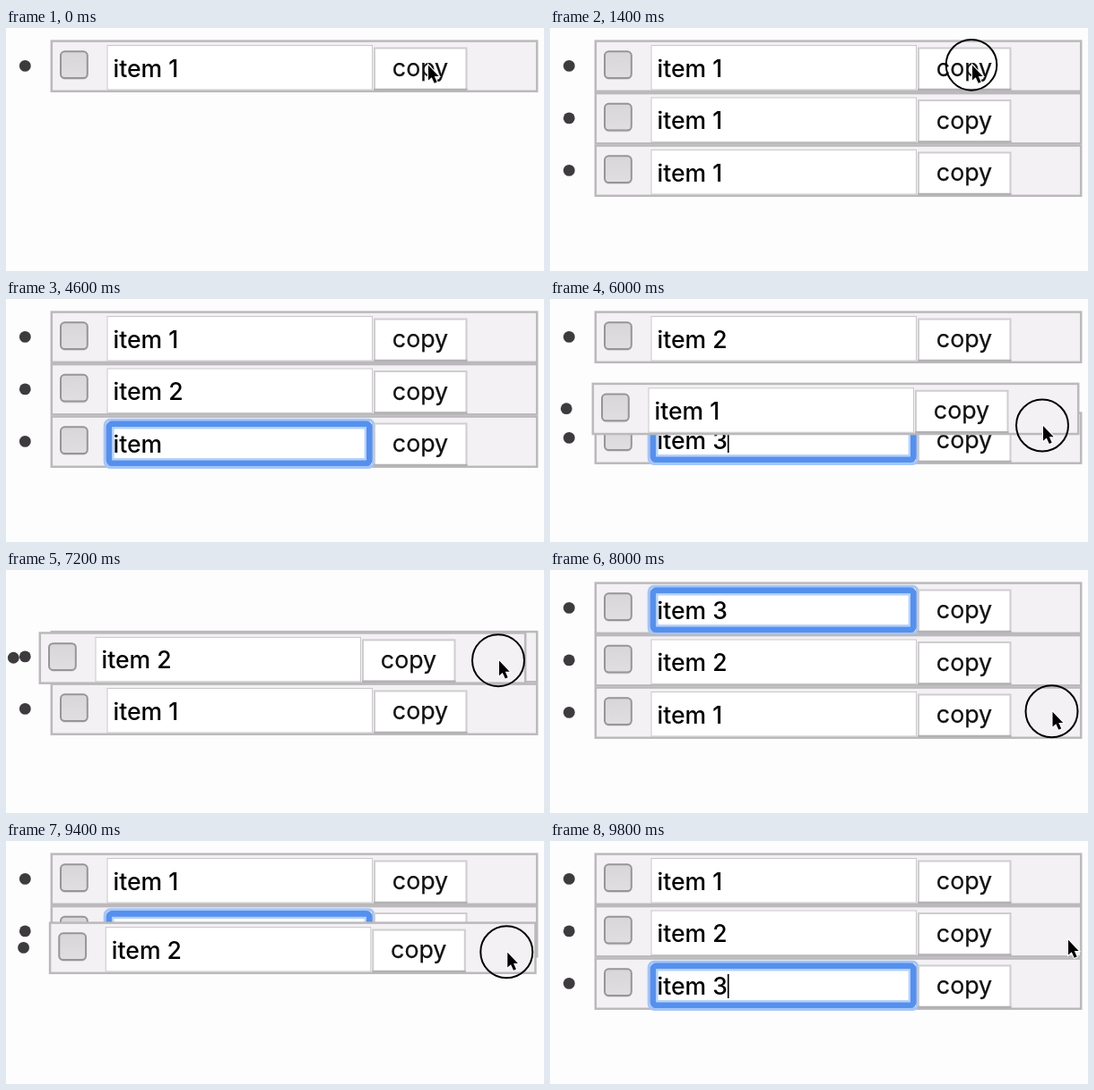
Recreate the animation shown at these times as an HTML page. Size 600 px wide and 272 px high, loop 10000 ms.

```html
<!DOCTYPE html>
<html lang="en">
<head>
<meta charset="utf-8">
<title>Sortable list</title>
<style>
  html, body { margin: 0; width: 100%; height: 100%; overflow: hidden; background: #fefdfe; }
  svg { display: block; width: 600px; height: 272px; }
  text { font: 26.8px Inter, "Open Sans", sans-serif; fill: #111; stroke: #111; stroke-width: .25; white-space: pre; }
  .label { font-size: 26.6px; font-weight: 500; fill: #000; stroke: none; }
</style>
</head>
<body>
<svg viewBox="0 0 600 272">
  <defs>
    <linearGradient id="box" x2="0" y2="1">
      <stop stop-color="#d8d6d8"/><stop offset="1" stop-color="#e0dee0"/>
    </linearGradient>
  </defs>
  <g id="list"></g>
  <g id="pointer">
    <circle cy=".3" fill="none" stroke="#000" stroke-width="2"/>
    <path id="arrow" transform="translate(1 1.5) scale(.82)" d="M0 -1V19.5L4.6 15.4L8.2 23.4L11.8 21.8L8.3 14H14.2Z" fill="#000" stroke="#fff" stroke-width="2.6" paint-order="stroke"/>
    <path id="beam" d="M-5 -10Q0 -10 0 -7Q0 -10 5 -10M0 -7V7M-5 10Q0 10 0 7Q0 10 5 10M-3 3H3" fill="none" stroke="#222" stroke-width="1.8"/>
  </g>
</svg>
<script>
const LOOP = 10000, STEP = 200, PITCH = 58.5, GAP_LOSS = 4;
const TRAVEL = 600, COPY_DELAY = 400, KEY_DELAY = 400, TYPING = 600, BLINK = 600;

// Everything the user does; the list state follows from these actions.
const actions = [
  { kind: "copy", at: 200, hold: 600, x: 470, y: 41 },
  { kind: "copy", at: 1000, hold: 600, x: 470, y: 41 },
  { kind: "edit", id: "2", at: 2200, hold: 200, x: 223, y: 97, wait: 600 },
  { kind: "edit", id: "3", at: 3600, hold: 400, x: 384, y: 162, wait: 800 },
  { kind: "drag", id: "1", at: 5600, hold: 800, x: 552, y: 61, reach: 113.5, sway: 3 },
  { kind: "drag", id: "2", at: 6800, hold: 800, x: 562, y: 45, reach: 79, sway: 13 },
  { kind: "drag", id: "1", at: 8000, hold: 800, x: 559.5, y: 158, reach: -138, sway: 8 },
  { kind: "drag", id: "2", at: 9200, hold: 600, x: 560, y: 164, reach: -80, sway: 2 },
  { kind: "rest", at: 9800, hold: 0, x: 577, y: 110 }
];
const ofKind = kind => actions.filter(a => a.kind === kind);
const [copies, edits, drags] = ["copy", "edit", "drag"].map(ofKind);

const $ = selector => document.querySelector(selector);
const show = (el, on) => el.setAttribute("display", on ? "inline" : "none");
const move = (el, x, y) => el.setAttribute("transform", `translate(${x} ${y})`);
const progress = (a, t) => a.hold ? Math.min(1, (t - a.at) / a.hold) : 1;

function dragOffset({ reach = 0, sway = 0, ...action }, t) {
  const k = progress(action, t);
  return [-sway * Math.sin(Math.PI * k), reach * Math.sin(Math.PI * k / 2)];
}

function pointerAt(t) {
  const next = actions.find(a => a.at > t);
  const last = actions.findLast(a => a.at <= t);
  if (!last) return [next.x, next.y];
  const [dx, dy] = dragOffset(last, t);
  const x = last.x + dx, y = last.y + dy;
  if (!next) return [x, y];
  const leave = Math.max(last.at + last.hold, next.at - TRAVEL);
  const k = Math.max(0, (t - leave) / (next.at - leave));
  return [x + (next.x - x) * k, y + (next.y - y) * k];
}

// Slot order; a held row passes a neighbour only after a full row of travel.
function arrange(t) {
  const added = copies.filter(a => t >= a.at + COPY_DELAY).length;
  const ids = ["1", "2", "3"].slice(0, 1 + added);
  let held = null;
  for (const drag of drags.filter(a => t > a.at)) {
    const dropped = t >= drag.at + drag.hold;
    const rows = dragOffset(drag, t)[1] / PITCH;
    const home = ids.indexOf(drag.id);
    ids.splice(home, 1);
    ids.splice(home + (dropped ? Math.round(rows) : Math.trunc(rows)), 0, drag.id);
    if (!dropped) held = { drag, home };
  }
  return { ids, held };
}

function labelAt(id, t) {
  const edit = edits.find(a => a.id === id);
  const typed = edit ? t - edit.at - edit.wait : -1;
  if (typed < 0) return "item 1";
  return typed < KEY_DELAY ? "item " : "item " + id;
}

function makeRow() {
  const row = document.createElementNS("http://www.w3.org/2000/svg", "g");
  row.innerHTML = `
    <circle cx="21.3" cy="42.4" r="6.4" fill="#3d3b3e"/>
    <rect x="50.8" y="14.6" width="541.4" height="56.2" fill="#f3f1f3" stroke="#bbb9bb" stroke-width="2.5"/>
    <rect x="61" y="27.5" width="30" height="30.5" rx="5" fill="#d9d7d9"/>
    <rect x="61" y="26.3" width="29.8" height="29.8" rx="4.5" fill="url(#box)" stroke="#979597" stroke-width="2"/>
    <rect x="113" y="19.5" width="295.5" height="49.5" fill="#fff" stroke="#c9c7c9"/>
    <g class="ring" fill="none">
      <rect x="110.2" y="18.2" width="300" height="53.2" rx="6" stroke="#a4c5f8" stroke-width="3"/>
      <rect x="115" y="23" width="290.2" height="43.6" rx="3" stroke="#5590ee" stroke-width="6.8"/>
      <rect x="119.4" y="27.4" width="281.4" height="34.8" stroke="#b4d0fa" stroke-width="2.2"/>
    </g>
    <rect x="411" y="22.5" width="102.5" height="46.5" fill="#fff" stroke="#cfcdcf" stroke-width="2"/>
    <path d="M410 69H514.5" stroke="#b3b1b3" stroke-width="2.5"/>
    <text class="label" x="119.5" y="54.5"></text>
    <rect class="caret" y="32" width="1.6" height="27" fill="#000"/>
    <text x="462" y="54" text-anchor="middle">copy</text>`;
  const part = name => row.querySelector("." + name);
  return { row, label: part("label"), ring: part("ring"), caret: part("caret") };
}

const rows = { 1: makeRow(), 2: makeRow(), 3: makeRow() };
Object.values(rows).forEach(({ row }) => $("#list").append(row));

function drawRows(t) {
  const { ids, held } = arrange(t);
  const gap = held ? ids.indexOf(held.drag.id) : Infinity;
  const focus = edits.findLast(a => a.at <= t);

  for (const id in rows) {
    const { row, label, ring, caret } = rows[id];
    const slot = ids.indexOf(id), focused = focus?.id === id;
    show(row, slot >= 0);
    label.textContent = labelAt(id, t);
    show(ring, focused);
    show(caret, focused && (t - focus.at) % (2 * BLINK) < BLINK);
    if (focused) caret.setAttribute("x", 119.5 + label.getComputedTextLength());
    move(row, 0, slot * PITCH - (slot > gap ? GAP_LOSS : 0));
  }
  ids.forEach(id => $("#list").append(rows[id].row));

  if (held) {
    const { row } = rows[held.drag.id];
    const [dx, dy] = dragOffset(held.drag, t);
    move(row, dx, held.home * PITCH + dy);
    $("#list").append(row);
  }
}

function drawPointer(t) {
  const [x, y] = pointerAt(t);
  const overInput = x > 113 && x < 408;
  const typing = edits.some(({ at, wait }) => t >= at + wait && t < at + wait + TYPING);
  const pressed = actions.find(a => t >= a.at && t < a.at + a.hold);
  const ring = $("#pointer circle");
  move($("#pointer"), x, y);
  show($("#pointer"), !typing);
  show($("#beam"), overInput);
  show($("#arrow"), !overInput);
  show(ring, pressed);
  if (pressed) {
    const swell = pressed.kind === "drag" ? 1 : Math.sin(Math.PI * progress(pressed, t));
    ring.setAttribute("r", 24 + 5 * swell);
  }
}

let shown = -1;
const begin = performance.now();
function tick() {
  const elapsed = (performance.now() - begin) % LOOP;
  const t = Math.floor(elapsed / STEP) * STEP;
  if (t !== shown) {
    drawRows(t);
    drawPointer(t);
    shown = t;
  }
  requestAnimationFrame(tick);
}
tick();
</script>
</body>
</html>
```
